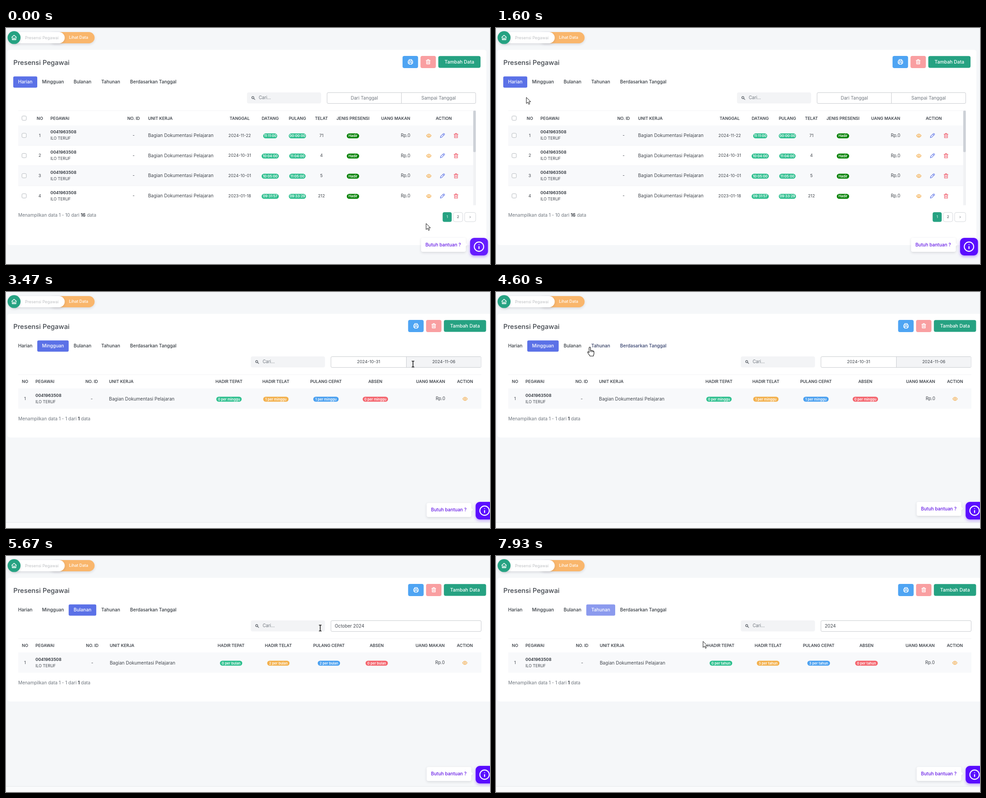
Write an HTML page that moves like this. It is 1068 by 524 pixels and loops after 8 s.

```html
<!DOCTYPE html>
<html lang="id">
<head>
<meta charset="utf-8">
<title>Presensi Pegawai</title>
<style>
html, body { margin: 0; width: 100%; height: 100%; overflow: hidden; background: #f5f7f9; }
svg { display: block; width: 100%; height: 100%; }
text { font-family: Inter, "Open Sans", sans-serif; white-space: pre; }
</style>
</head>
<body>
<svg id="stage" viewBox="0 0 1068 524"></svg>
<script>
const LOOP = 8000, STEP = 1000 / 15;
const INK = '#41464d', MUTED = '#70777f', GREEN = '#26a282', INDIGO = '#5b71e7', PALE = '#f3f4f6';
const PERSON = { id: '0041963508', name: 'ILO TERUF', unit: 'Bagian Dokumentasi Pelajaran' };

const text = (x, mid, str, { size = 10.1, fill = INK, weight = 400, anchor = 'start', attrs = '' } = {}) =>
  `<text x="${x}" y="${mid + size * 0.36}" font-size="${size}" fill="${fill}" font-weight="${weight}" text-anchor="${anchor}" ${attrs}>${str}</text>`;
const center = (x, mid, str, opt = {}) => text(x, mid, str, { ...opt, anchor: 'middle' });
const box = (x, y, w, h, r, fill, attrs = '') =>
  `<rect x="${x}" y="${y}" width="${w}" height="${h}" rx="${r}" fill="${fill}" ${attrs}/>`;
const line = (x1, x2, y, color) => `<path d="M${x1} ${y}H${x2}" stroke="${color}"/>`;
const icon = (x, y, d, color, width = 1.1) =>
  `<path transform="translate(${x} ${y})" d="${d}" fill="none" stroke="${color}" stroke-width="${width}" stroke-linecap="round" stroke-linejoin="round"/>`;
const pill = (x, y, w, label, color) =>
  box(x - w / 2, y - 5.5, w, 11, 5.5, color) + center(x, y - 0.2, label, { size: 7.6, fill: '#fff', weight: 600 });
const head = (x, y, str, anchor = 'middle') => text(x, y, str, { size: 9.15, weight: 600, anchor });

const ICONS = {
  home: 'M-5 -.5L0 -5 5 -.5M-4 -1.4V5H4V-1.4M-1.4 5V1.4H1.4V5',
  printer: 'M-3 -2V-5H3V-2M-3 3H-5V-2H5V3H3M-3 1H3V5H-3Z',
  trash: 'M-4.4 -3H4.4M-1.6 -3V-4.8H1.6V-3M-3.4 -3V4.8H3.4V-3M-1.2 -.8V2.8M1.2 -.8V2.8',
  pencil: 'M-4.6 4.6L-4 1.6 2.2 -4.5Q3 -5.2 3.8 -4.4L4.4 -3.8Q5.2 -3 4.5 -2.2L-1.7 4ZM1 -3.2L3.2 -1',
  eye: 'M-5 0Q-2.8 -3.7 0 -3.7T5 0Q2.8 3.7 0 3.7T-5 0ZM-1.7 0A1.7 1.7 0 1 0 1.7 0A1.7 1.7 0 1 0 -1.7 0',
  search: 'M-3.3 -1A2.3 2.3 0 1 0 1.3 -1A2.3 2.3 0 1 0 -3.3 -1M.8 .8L3.5 3.4'
};

const TABS = [
  ['Harian', 16, 69], ['Mingguan', 69, 138.3], ['Bulanan', 138.3, 199.2],
  ['Tahunan', 199.2, 263], ['Berdasarkan Tanggal', 263, 387]
];

function breadcrumb() {
  return box(95, 9, 100.5, 25, 12.5, '#f9b66c', 'filter="url(#soft)"') +
    box(10, 9, 119.5, 25, 12.5, '#fff', 'filter="url(#soft)"') +
    `<circle cx="17.8" cy="21.3" r="14.3" fill="${GREEN}" filter="url(#soft)"/>` +
    icon(17.8, 21, ICONS.home, '#fff', 1.4) +
    text(42, 21.3, 'Presensi Pegawai', { size: 8.9, fill: '#bfc1c4' }) +
    text(139, 21.3, 'Lihat Data', { size: 8.8, fill: '#fff', weight: 500 });
}

function frame(wide) {
  const dx = wide ? 12.3 : 0;
  return box(3, 48.5, wide ? 1080 : 1057, wide ? 274.5 : 433.5, 5, '#fff') +
    text(16.3, 76.3, 'Presensi Pegawai', { size: 14.7, weight: 500 }) +
    box(875 + dx, 62, 34.3, 27, 4, '#4ea4f3') + icon(892.4 + dx, 75.3, ICONS.printer, '#fff', 1.4) +
    box(914.6 + dx, 62, 34, 27, 4, '#f99fa1') + icon(931.6 + dx, 75, ICONS.trash, '#fff', 1.4) +
    box(953.9 + dx, 62.3, 93.2, 26.2, 4, GREEN) +
    center(1000.5 + dx, 75, 'Tambah Data', { size: 10.4, fill: '#fff', weight: 500 });
}

function search(x) {
  return box(x, 143, 163.6, 24.6, 4, PALE) + icon(x + 14, 155.5, ICONS.search, '#555b62', 1.2) +
    text(x + 26, 155, 'Cari...', { size: 9.7, fill: MUTED });
}

function dateField(x, w) {
  return box(x + 0.5, 143.5, w - 1, 24, 2.5, '#fff', 'stroke="#c9ccd0"');
}

function person(x, y) {
  return text(x, y - 7.3, PERSON.id, { size: 9.1, weight: 700 }) + text(x, y + 7, PERSON.name, { size: 8.8 });
}

function summary(y, range, total) {
  return text(27, y, `Menampilkan data ${range} dari <tspan font-weight="700" fill="${INK}">${total}</tspan> data`, { fill: MUTED, size: 10 });
}

function dailyRow([date, arrive, leave, late], i) {
  const y = 238.3 + i * 44.75, w = s => s.startsWith('11') ? (s.startsWith('11:1') ? 31 : 36) : 38;
  return (i % 2 ? '' : box(27, y - 22, 1004, 44.7, 0, '#f8f9fb')) +
    line(27, 1031, y + 22.5, '#f3f4f6') +
    box(35.2, y - 4.6, 9.6, 9.6, 2.3, '#fff', 'stroke="#b4b9be"') +
    center(74.5, y, i + 1, { size: 9.4 }) + person(98, y) + center(281.5, y, '-') +
    text(313.5, y, PERSON.unit) + center(515.6, y, date, { size: 9.2 }) +
    pill(583, y + 1.3, w(arrive), arrive, '#2fbf8f') + pill(643, y + 1.3, w(leave), leave, '#2fbf8f') +
    center(696, y, late, { size: 9.4 }) + pill(765.6, y + 1.3, 27.4, 'Hadir', '#078207') +
    text(892, y, 'Rp.0', { size: 9.7, anchor: 'end' }) +
    icon(933, y + 0.6, ICONS.eye, '#f3ab4a') + icon(963, y + 0.5, ICONS.pencil, INDIGO) +
    icon(993, y + 0.6, ICONS.trash, '#f0606f');
}

function daily() {
  const rows = [
    ['2024-11-22', '11:11:00', '00:00:00', 71], ['2024-10-31', '10:04:00', '11:04:00', 4],
    ['2024-10-01', '10:05:00', '11:05:00', 5], ['2023-01-18', '09:31:57', '09:33:29', 212]
  ];
  const heads = [['NO', 74.7], ['NO. ID', 281.5], ['TANGGAL', 515.6], ['DATANG', 583], ['PULANG', 643],
    ['TELAT', 696], ['JENIS PRESENSI', 765.7], ['ACTION', 966]];
  return frame(false) + search(531.7) + dateField(708, 329) +
    `<path d="M872.5 144V167" stroke="#c9ccd0"/>` +
    center(790.7, 155, 'Dari Tanggal', { fill: MUTED }) + center(954.5, 155, 'Sampai Tanggal', { fill: MUTED }) +
    line(27, 1031, 183.5, '#f3f4f6') +
    box(35.2, 195.4, 9.6, 9.6, 2.3, '#fff', 'stroke="#b4b9be"') +
    heads.map(([s, x]) => head(x, 200.7, s)).join('') +
    head(98, 200.7, 'PEGAWAI', 'start') + head(313.5, 200.7, 'UNIT KERJA', 'start') + head(892, 200.7, 'UANG MAKAN', 'end') +
    `<g clip-path="url(#list)">${rows.map(dailyRow).join('')}</g>` +
    box(1031, 183, 6, 210.5, 0, '#f1f2f4') + box(1031, 183.5, 5.6, 92, 2, '#cdd1d7') +
    summary(415.7, '1 - 10', 16) +
    box(963.5, 409, 20, 21.5, 4, GREEN) + center(973.6, 419.6, '1', { size: 8, fill: '#fff' }) +
    box(987, 409.5, 20.8, 20.5, 4, '#fff', 'stroke="#d5d8dc"') + center(997.4, 419.6, '2', { size: 8 }) +
    box(1012, 409.5, 24.5, 20.5, 4, '#fff', 'stroke="#d5d8dc"') + icon(1024.2, 419.8, 'M-.9 -1.8L.9 0 -.9 1.8', MUTED, 1);
}

function recap({ field, unit, counts, width, idX, unitX, cols, moneyX, actionX }) {
  const heads = ['HADIR TEPAT', 'HADIR TELAT', 'PULANG CEPAT', 'ABSEN'];
  const colors = ['#2fc08f', '#f3b04c', '#4aa0f0', '#f4636c'];
  return frame(true) + search(540.2) + dateField(716.5, 332.5) + field +
    line(27, 1049, 183.5, '#f3f4f6') + box(27, 214, 1022, 45, 0, '#f8f9fb') +
    head(42, 198.8, 'NO') + head(65, 198.8, 'PEGAWAI', 'start') + head(idX, 198.8, 'NO. ID') +
    head(unitX, 198.8, 'UNIT KERJA', 'start') +
    heads.map((s, i) => head(cols[i], 198.8, s)).join('') +
    head(moneyX, 198.8, 'UANG MAKAN', 'end') + head(actionX, 198.8, 'ACTION') +
    center(42, 237, '1', { size: 9.4 }) + person(65, 236.8) + center(idX, 237, '-') + text(unitX, 237, PERSON.unit) +
    counts.map((n, i) => pill(cols[i], 238, width, `${n} per ${unit}`, colors[i])).join('') +
    text(moneyX, 237, 'Rp.0', { size: 9.7, anchor: 'end' }) + icon(actionX, 237.2, ICONS.eye, '#f3ab4a') +
    summary(281.7, '1 - 1', 1) + box(0, 511, 1068, 13, 0, '#fafbfc') + line(0, 1068, 511.5, '#e4e7ea');
}

const range = box(883, 144, 165.5, 23, 2, PALE) + `<path d="M883.5 144V167" stroke="#c9ccd0"/>` +
  center(800, 155, '2024-10-31', { size: 9.4 }) + center(966, 155, '2024-11-06', { size: 9.4 });
const single = s => text(725.5, 155, s, { size: 9.9 });

// Each view starts when its data has arrived.
const VIEWS = [
  { start: 0, html: daily() },
  { start: 2195, html: recap({ field: range, unit: 'minggu', counts: [0, 1, 1, 0], width: 56, idX: 189, unitX: 227.3,
    cols: [492, 595.5, 706, 815], moneyX: 969, actionX: 1013 }) },
  { start: 4930, html: recap({ field: single('October 2024'), unit: 'bulan', counts: [0, 2, 2, 0], width: 49.3, idX: 190.3, unitX: 229,
    cols: [496.7, 601, 712.5, 818], moneyX: 968, actionX: 1012.5 }) },
  { start: 7615, html: recap({ field: single('2024'), unit: 'tahun', counts: [0, 3, 3, 0], width: 50, idX: 190, unitX: 229,
    cols: [496.3, 600.5, 712, 817.5], moneyX: 968, actionX: 1012.5 }) }
];

// Pointer path: time, x, y
const PATH = [
  [0, 927, 434], [250, 800, 350], [550, 480, 215], [870, 234, 145], [1200, 60, 140], [1600, 67, 154], [1800, 76, 142],
  [2000, 102, 121], [2250, 108, 121], [2470, 160, 121], [2700, 300, 138], [3100, 760, 158], [3500, 900, 160],
  [3950, 780, 158], [4330, 534, 142], [4440, 370, 126], [4600, 207, 124], [4750, 172, 122], [5150, 178, 123],
  [5350, 350, 146], [5670, 695, 160], [6050, 820, 161], [6400, 700, 163], [6850, 270, 155], [7070, 280, 154],
  [7300, 234, 122], [7630, 233, 122], [7800, 345, 160], [7930, 455, 189], [8000, 500, 200]
];

function pointer(t) {
  const i = Math.max(1, PATH.findIndex(p => p[0] >= t));
  const at = k => PATH[Math.min(PATH.length - 1, Math.max(0, k))];
  const a = at(i - 1), b = at(i), span = b[0] - a[0], u = (t - a[0]) / span;
  const slope = (k, c) => (at(k + 1)[c] - at(k - 1)[c]) / (at(k + 1)[0] - at(k - 1)[0]) * 0.7;
  return [1, 2].map(c => {
    const m0 = slope(i - 1, c) * span, m1 = slope(i, c) * span, d = b[c] - a[c];
    return a[c] + u * (m0 + u * (3 * d - 2 * m0 - m1 + u * (m0 + m1 - 2 * d)));
  });
}

const within = ([x, y], x1, x2, y1, y2) => x >= x1 && x <= x2 && y >= y1 && y <= y2;
const mix = (a, b, u) => `rgb(${a.map((v, i) => Math.round(v + (b[i] - v) * u))})`;
const clamp = v => Math.min(1, Math.max(0, v));

function hover(t, [, x1, x2]) {
  let sum = 0;
  for (let k = 0; k < 10; k++) sum += within(pointer(Math.max(0, t - k * 20)), x1, x2, 107, 132);
  return sum / 10;
}

const stage = document.getElementById('stage');
stage.innerHTML = `<defs>
  <filter id="soft" x="-30%" y="-50%" width="160%" height="220%"><feDropShadow dx="0" dy="2" stdDeviation="2.5" flood-color="#445" flood-opacity=".18"/></filter>
  <filter id="glow" x="-40%" y="-40%" width="180%" height="190%"><feDropShadow dx="0" dy="2.5" stdDeviation="3" flood-color="#5a0bff" flood-opacity=".4"/></filter>
  <clipPath id="list"><rect x="27" y="216" width="1004" height="177.5"/></clipPath></defs>
  ${breadcrumb()}
  ${VIEWS.map(v => `<g class="view">${v.html}</g>`).join('')}
  ${TABS.map(([s, a, b]) => box(a, 107.5, b - a, 25, 3, INDIGO, 'class="fill"') +
    center((a + b) / 2, 119.7, s, { size: 10.15, weight: 500, attrs: 'class="tab"' })).join('')}
  <g id="help">
    <g id="bubble" filter="url(#soft)">${box(916, -15, 98.5, 31, 4, '#fff')}<path d="M1014 -4L1018 0 1014 4Z" fill="#fff"/>
      ${center(964.7, 0.2, 'Butuh bantuan ?', { fill: '#6519e6', weight: 500 })}</g>
    ${box(1024, 466, 39.5, 39, 9, '#5a0bff', 'id="info" filter="url(#glow)"')}
    <circle cx="1043.7" cy="485.5" r="10.4" fill="none" stroke="#fff" stroke-width="2.1"/>
    <path d="M1043.7 484.5V490.5M1043.7 480.2V481.6" stroke="#fff" stroke-width="2.3"/>
  </g>
  <g id="cursor" stroke-linejoin="round">
    <path d="M0 0V13.6L3.2 10.7 5.3 15.5 7.5 14.5 5.5 9.8H9.6Z" fill="#fff" stroke="#111"/>
    <path d="M-1.6 0a1.6 1.6 0 0 1 3.2 0v6.2c.5-1 2.6-.9 2.9.4.6-.8 2.5-.5 2.7.7.8-.5 2 .1 2 1.3v4.2c0 2-1.2 3.2-1.4 5.4h-7.6c-.6-2.4-3.4-4.2-5-7.8-.6-1.5 1.2-2.2 2.2-1.1l1 1.3zM1.6 6.2v3M4.5 6.6v2.8M7.2 7.3v2.3" fill="#fff" stroke="#111" stroke-width="1.1"/>
    <path d="M-2.8 -6.5H-.8L0 -5.8 .8 -6.5H2.8M0 -6V6M-2.8 6.5H-.8L0 5.8 .8 6.5H2.8" fill="none" stroke="#111" stroke-width="1.5"/>
  </g>`;

const all = s => [...stage.querySelectorAll(s)];
const views = all('.view'), fills = all('.fill'), labels = all('.tab'), shapes = all('#cursor > path');
const [help, bubble, info, cursor] = ['#help', '#bubble', '#info', '#cursor'].map(s => stage.querySelector(s));
const only = (nodes, index) => nodes.forEach((n, i) => n.setAttribute('display', i === index ? 'inline' : 'none'));

function render(t) {
  const view = VIEWS.filter(v => v.start <= t).length - 1;
  only(views, view);
  only(fills, view);
  fills[view].setAttribute('opacity', view ? clamp((t - VIEWS[view].start) / 450) : 1);
  labels.forEach((n, i) => n.setAttribute('fill', i === view ? '#fff' : mix([52, 58, 64], [48, 66, 150], hover(t, TABS[i]))));

  help.setAttribute('transform', `translate(${view ? 12.3 : 0} 0)`);
  const bob = 483.3 - 2.3 * Math.cos((t - 1560) / 1500 * 2 * Math.PI);
  bubble.setAttribute('transform', `translate(0 ${bob.toFixed(2)})`);
  info.setAttribute('fill', mix([101, 31, 255], [90, 11, 255], clamp(t / 250)));

  const p = pointer(t), x0 = view ? 540 : 532;
  const typing = within(p, x0, x0 + 164, 143, 167) || within(p, view ? 717 : 708, view ? 1049 : 1037, 143, 167);
  only(shapes, within(p, 16, 387, 107, 132) ? 1 : typing ? 2 : 0);
  cursor.setAttribute('transform', `translate(${p[0].toFixed(1)} ${p[1].toFixed(1)})`);
}

const begin = performance.now();
function tick() {
  const t = (performance.now() - begin) % LOOP;
  // Ticks fall on whole hundredths of a second, so allow for their rounding.
  render(Math.min(LOOP, Math.floor((t + 5) / STEP) * STEP));
  requestAnimationFrame(tick);
}
tick();
</script>
</body>
</html>
```
